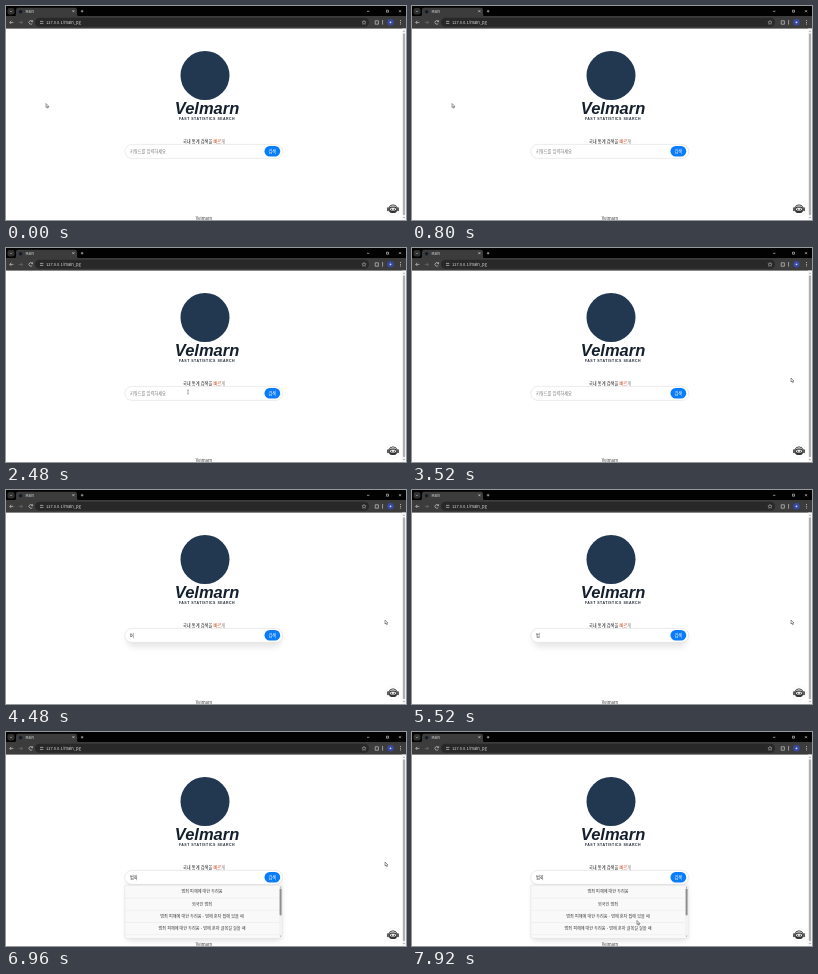
Write an HTML page that moves like this. It is 400 px wide and 214 px high and loops after 8 s.

```html
<!DOCTYPE html>
<html lang="ko">
<head>
<meta charset="utf-8">
<title>Statistics search</title>
<style>
html, body { margin: 0; width: 100%; height: 100%; overflow: hidden; background: #fff; }
svg { display: block; width: 100vw; height: 100vh; }
text { font-family: "Noto Sans CJK KR", "Noto Sans CJK", "Noto Sans", sans-serif; font-size: 4.2px; }
.mid { text-anchor: middle; }
.line { fill: none; stroke: #ddd; stroke-width: .6; }
.brand { font: italic bold 16.5px "Liberation Sans", sans-serif; fill: #15202e; }
.tag { font: bold 3.5px "Liberation Sans", sans-serif; letter-spacing: .48px; fill: #1d2733; }
</style>
</head>
<body>
<svg viewBox="0 0 400 214" preserveAspectRatio="none">
  <defs>
    <filter id="soft" x="-20%" y="-100%" width="140%" height="350%"><feGaussianBlur stdDeviation="3"/></filter>
  </defs>
  <rect width="400" height="214" fill="#fff"/>

  <g id="browser">
    <rect width="400" height="10.5" fill="#020202"/>
    <rect y="10" width="400" height="12.6" fill="#3c3c3c"/>
    <path d="M8 10.5Q10 10.5 10 8V4Q10 1.8 12 1.8H69Q71 1.8 71 4V8Q71 10.5 73 10.5Z" fill="#3c3c3c"/>
    <rect x="1.5" y="2" width="7" height="6.6" rx="2" fill="#303030"/>
    <path class="line" d="M4 4.8l1 1 1-1M66.4 4.2l2 2m0-2l-2 2M74.8 5.2h2.6m-1.3-1.3v2.6"/>
    <path class="line" d="M361 5.3h2.4M380.5 4.2h2v2h-2zM393 4.2l2 2m0-2l-2 2"/>
    <circle cx="14.6" cy="5.7" r="1.7" fill="#111b2a"/>
    <text x="19.5" y="7" fill="#e2e2e2" style="font-size:3.7px">Main</text>
    <rect x="29" y="11.8" width="334" height="9" rx="4.5" fill="#282828"/>
    <path class="line" d="M7.4 16.4H3.8m1.5-1.6l-1.6 1.6 1.6 1.6"/>
    <path class="line" style="stroke:#777" d="M12.8 16.4h3.6m-1.5-1.6l1.6 1.6-1.6 1.6"/>
    <path class="line" d="M26.3 15.4A1.8 1.8 0 1 0 26.4 17.2M26.6 14.2v1.4h-1.4"/>
    <path class="line" d="M34 15.4h3.4M34 17.4h3.4"/>
    <text x="40" y="18" fill="#ddd" style="font-size:4px">127.0.0.1/main_pg</text>
    <path class="line" style="stroke-width:.4" d="M358 14.3l.6 1.4 1.5.1-1.1 1 .3 1.5-1.3-.8-1.3.8.3-1.5-1.1-1 1.5-.1z"/>
    <path class="line" d="M369.2 14.8h3.2v3.4h-3.2zM376.6 14v4.6"/>
    <circle cx="384.5" cy="16.3" r="3.2" fill="#3949a3"/>
    <circle cx="384.5" cy="16.3" r=".9" fill="#d8dcf4"/>
    <path d="M394.5 14.6v.01m0 1.7v.01m0 1.7v.01" stroke="#ddd" stroke-width=".9" stroke-linecap="round"/>
    <rect x="396" y="22.6" width="4" height="191.4" fill="#f6f6f6"/>
    <path d="M397 25.8l1-1.2 1 1.2z" fill="#888"/>
    <rect x="396.9" y="27.3" width="2.2" height="182" rx="1.1" fill="#b0b0b0"/>
    <path d="M397 211l1 1.2 1-1.2z" fill="#888"/>
  </g>

  <circle cx="199" cy="69.5" r="24.5" fill="#223750"/>
  <text class="brand mid" x="201" y="108">Velmarn</text>
  <text class="tag mid" x="201" y="114.3">FAST STATISTICS SEARCH</text>

  <text class="mid" x="198" y="136.5" fill="#222">국내 통계 검색을 <tspan fill="#d5502d">빠르</tspan><tspan fill="#777">게</tspan></text>
  <rect id="glow" x="121" y="143" width="154" height="14" rx="7" fill="#000" opacity="0" filter="url(#soft)"/>
  <rect x="118.8" y="138.4" width="158" height="14" rx="7" fill="#fff" stroke="#dedede" stroke-width=".6"/>
  <text id="query" x="124" y="146.9"></text>
  <rect x="258.5" y="140" width="15.7" height="10.4" rx="5.2" fill="#087cfb"/>
  <text class="mid" x="266.3" y="146.9" fill="#fff">검색</text>

  <g id="results"></g>

  <text class="mid" x="198" y="214.3" fill="#333">Velmarn</text>
  <g id="helper">
    <circle cx="387" cy="203" r="7" fill="#fff" stroke="#eee" stroke-width=".5"/>
    <path d="M382.8 202A4.3 4 0 0 1 391.2 202" fill="none" stroke="#333" stroke-width=".9"/>
    <rect x="381.2" y="201.2" width="1.6" height="4" rx=".8" fill="#333"/>
    <rect x="391.2" y="201.2" width="1.6" height="4" rx=".8" fill="#333"/>
    <rect x="383.1" y="200.5" width="7.8" height="6.4" rx="2.6" fill="#333"/>
    <rect x="384.2" y="201.8" width="5.6" height="2.8" rx="1.4" fill="#fff"/>
    <circle cx="385.7" cy="203.2" r=".7" fill="#333"/>
    <circle cx="388.3" cy="203.2" r=".7" fill="#333"/>
  </g>

  <g id="pointer">
    <path id="arrow" d="M0 0V4L1 3.2 1.7 4.7 2.3 4.4 1.7 3H2.9Z" fill="#fff" stroke="#222" stroke-width=".45"/>
    <path id="beam" d="M-.7 0H.7M0 0V4M-.7 4H.7" fill="none" stroke="#333" stroke-width=".4"/>
  </g>
</svg>
<script>
const LOOP = 8000;
const FOCUS_AT = 3600;
const RESULTS_AT = 6480;
const $ = id => document.getElementById(id);

// [time, x, y]
const path = [
  [0, 40, 97.5], [1000, 40, 97.5], [1520, 147, 128.5], [1760, 175, 139.5],
  [2160, 182, 142], [2800, 182, 142], [3440, 379, 130], [7100, 379, 130],
  [7440, 357, 130.5], [7840, 225, 188.5], [LOOP, 225, 188.5]
];

const typing = [
  [0, ""], [4160, "ㅂ"], [4320, "버"], [4800, "범"],
  [5760, "범ㅈ"], [5920, "범조"], [6080, "범죄"]
];

const suggestions = [
  "범죄 피해에 대한 두려움",
  "외국인 범죄",
  "범죄 피해에 대한 두려움 - 밤에 혼자 집에 있을 때",
  "범죄 피해에 대한 두려움 - 밤에 혼자 골목길 걸을 때"
];

$("results").innerHTML =
  `<rect x="121" y="156" width="154" height="52" rx="2" opacity=".14" filter="url(#soft)"/>
   <rect x="118.8" y="153.3" width="157.6" height="53.2" rx="1.5" fill="#f9f9f9" stroke="#ddd" stroke-width=".5"/>` +
  suggestions.map((label, i) => {
    const y = 161.4 + i * 12.2;
    return `<text class="mid" x="196" y="${y}" fill="#333" style="font-size:4.1px">${label}</text>
      <path d="M119 ${y + 4.7}H273" stroke="#e6e6e6" stroke-width=".5"/>`;
  }).join("") +
  `<rect x="273" y="153.6" width="3.2" height="52.6" fill="#f3f3f3"/>
   <rect x="273.6" y="156.5" width="2" height="27" rx="1" fill="#8f8f8f"/>
   <path d="M273.8 155.4l.8-1 .8 1zM273.8 203.7l.8 1 .8-1z" fill="#777"/>`;

function pointerAt(t) {
  const i = path.findIndex(p => p[0] > t);
  const [t0, x0, y0] = path[i - 1];
  const [t1, x1, y1] = path[i];
  const k = (t - t0) / (t1 - t0);
  return [x0 + (x1 - x0) * k, y0 + (y1 - y0) * k];
}

function draw(t) {
  const [x, y] = pointerAt(t);
  const overInput = x > 119 && x < 258 && y > 138.4 && y < 152;
  $("pointer").setAttribute("transform", `translate(${x} ${y})`);
  $("arrow").style.display = overInput ? "none" : "";
  $("beam").style.display = overInput ? "" : "none";

  const typed = typing.filter(step => step[0] <= t).pop()[1];
  $("query").textContent = typed || "키워드를 입력하세요";
  $("query").setAttribute("fill", typed ? "#222" : "#777");

  const focus = Math.min(1, Math.max(0, (t - FOCUS_AT) / 300));
  $("glow").setAttribute("opacity", focus * 0.1);
  $("results").style.display = t >= RESULTS_AT ? "" : "none";
}

const start = performance.now();
function tick() {
  draw((performance.now() - start) % LOOP);
  requestAnimationFrame(tick);
}
tick();
</script>
</body>
</html>
```
